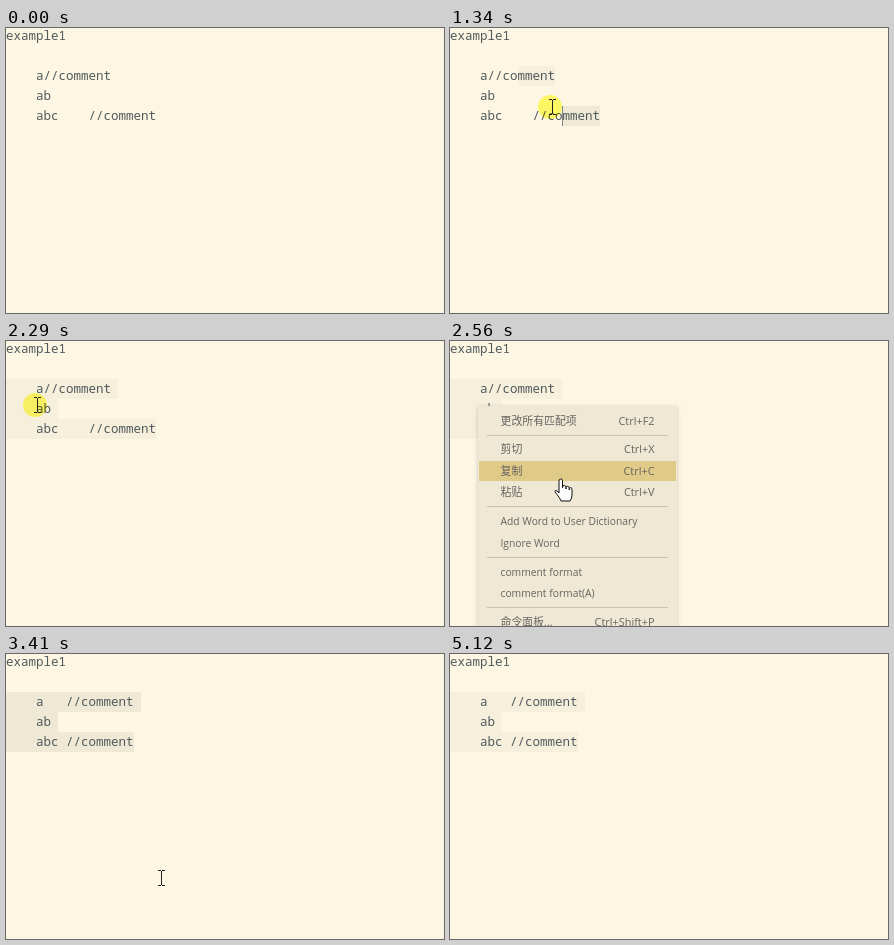
These frames come from a looping animation (438 px wide and 285 px high, 5.19 s). An HTML page:

```html
<!DOCTYPE html>
<html lang="en">
<head>
<meta charset="utf-8">
<title>Comment format</title>
<style>
html, body { margin: 0; height: 100%; overflow: hidden; background: #fdf6e3; }
svg { display: block; width: 438px; height: 285px; }
text { white-space: pre; }
#code { font: 500 12.5px "Noto Sans Mono", monospace; fill: #505a5d; }
#menu { font: 10.9px "Open Sans", "Noto Sans CJK SC", "Noto Sans CJK", sans-serif; fill: #66645f; }
#menu .latin { font-size: 10.3px; }
#panel { fill: #eee8d5; filter: drop-shadow(0 1px 2px #0003); }
#hover { fill: #dfca88; }
#click { fill: #ffff70; mix-blend-mode: multiply; }
</style>
</head>
<body>
<svg viewBox="0 0 438 285">
  <g id="marks" shape-rendering="crispEdges"></g>
  <g id="code"></g>
  <g id="menu">
    <rect id="panel" x="28" y="65" width="199" height="240"/>
    <rect id="hover" x="29" width="197" height="19.6" shape-rendering="crispEdges"/>
  </g>
  <g id="pointer">
    <circle id="click" cx="-2" r="12"/>
    <path id="beam" d="M-3-7.5H0M1-7.5H4M.5-7V7M-3 7.5H0M1 7.5H4" stroke="#222" shape-rendering="crispEdges"/>
    <path id="hand" transform="translate(-1 -1)" fill="#fff" stroke="#111" stroke-linejoin="round"
      d="M-2 14V2q0-2 1.7-2T1.5 2V9V8q0-1.5 1.7-1.5T5 8.5V10V8.5q.3-1.2 1.7-1.2T8.3 9.5V11V9.5q.4-1 1.6-.8T11 10.5V16q0 3-2 6H0q-1-3-4-6.5t-1.5-4Q-4 11-2 14Z"/>
  </g>
</svg>
<script>
const LOOP = 5190, ENTER = 250, STEP = 68;
const CHAR = 7.5, LINE = 20, ROW = 21.5, GAP = 7.3;
const DARK = '#eee8d5', LIGHT = '#f6efdc';
const before = ['example1', '', '    a//comment', '    ab', '    abc    //comment'];
const after = ['example1', '', '    a   //comment', '    ab', '    abc //comment'];
const groups = [
  [['更改所有匹配项', 'Ctrl+F2']],
  [['剪切', 'Ctrl+X'], ['复制', 'Ctrl+C'], ['粘贴', 'Ctrl+V']],
  [['Add Word to User Dictionary'], ['Ignore Word']],
  [['comment format'], ['comment format(A)']],
  [['命令面板...', 'Ctrl+Shift+P']]
];
// Pointer strokes: start, end, target x, target y, height of arc
const strokes = [
  [0, 0, 310, 254], [250, 730, 164, 101], [730, 870, 154, 90],
  [870, 1340, 102, 79], [1340, 1670, 3, 51], [1880, 2280, 31, 64],
  [2360, 2560, 112, 138], [2560, 2900, 155, 224],
  [3740, 3880, 169, 194], [4220, 4650, 410, 272, 58]
];

const $ = id => document.getElementById(id);
const show = (id, on) => $(id).setAttribute('display', on ? 'inline' : 'none');
const within = (t, a, b) => t >= a && t < b;

function add(parent, tag, attrs, text = '') {
  const el = document.createElementNS('http://www.w3.org/2000/svg', tag);
  for (const k in attrs) el.setAttribute(k, attrs[k]);
  el.textContent = text;
  return $(parent).appendChild(el);
}

const rows = before.map((_, i) => add('code', 'text', { x: 0, y: 12 + i * LINE }));

const centers = [];
let cy = 79.65;
groups.forEach((group, i) => {
  if (i) {
    const y = Math.floor(cy - (ROW + GAP) / 2 + GAP);
    add('menu', 'rect', { x: 37, y, width: 181, height: 1, fill: '#c6c1b2' });
    cy += GAP;
  }
  for (const [label, key = ''] of group) {
    const y = Math.round(cy) + 4;
    add('menu', 'text', { x: 50.5, y, class: label < '~' ? 'latin' : '' }, label);
    add('menu', 'text', { x: 204.5, y, 'text-anchor': 'end' }, key);
    centers.push(cy);
    cy += ROW;
  }
});

function pointerAt(t) {
  let x = 0, y = 0;
  for (const [start, end, tx, ty, arc = 0] of strokes) {
    if (t < start) break;
    const k = Math.min(1, (t - start) / (end - start || 1) + !end);
    x += (tx - x) * k;
    y += (ty - y) * k - arc * Math.sin(Math.PI * k);
  }
  return [x, y];
}

function mark(line, x0, x1, fill) {
  if (x1 > x0) add('marks', 'rect', { x: x0, y: line * LINE - 2, width: x1 - x0, height: LINE, fill });
}

function drawSelection(t, step, lines) {
  $('marks').textContent = '';
  if (t < 870) return;
  let line = 2, col = 0;
  const dragging = t < 1740;
  if (dragging) {
    // The selection trails the pointer by one step
    const [x, y] = pointerAt(step - STEP);
    line = Math.max(2, Math.min(4, Math.floor((y + 2) / LINE)));
    col = Math.min(lines[line].length, Math.round(x / CHAR));
  }
  const fill = within(t, 2270, 3410) || t >= 5120 ? LIGHT : DARK;
  for (let i = line; i < 5; i++)
    mark(i, i == line ? col * CHAR : 0, lines[i].length * CHAR + (i < 4 ? 7 : 0), fill);
  // Matching word on the first commented line
  if (line == 4 && col > 10) mark(2, (col - 6) * CHAR, 14 * CHAR, LIGHT);
  if (dragging) mark(line, Math.floor(col * CHAR), Math.floor(col * CHAR) + 1, '#7b8788');
}

function draw(t) {
  const step = ENTER + STEP * Math.floor((t - ENTER) / STEP + .1);
  const lines = t < 3410 ? before : after;
  rows.forEach((row, i) => row.textContent = lines[i]);
  drawSelection(t, step, lines);

  const [x, y] = pointerAt(step).map(Math.round);
  const menu = within(t, 2355, 3410);
  const center = centers.find(c => y > 66 && Math.abs(y - c) <= 10);
  show('menu', menu);
  show('hover', center);
  if (center) $('hover').setAttribute('y', center - 10);

  $('pointer').setAttribute('transform', `translate(${x} ${y})`);
  show('pointer', within(t, ENTER, 4715));
  show('click', within(t, 870, 1875) || within(t, 2190, 2355) || within(t, 3340, 3405));
  show('beam', !menu);
  show('hand', menu);
}

const begin = performance.now();
function tick() {
  draw((performance.now() - begin) % LOOP);
  requestAnimationFrame(tick);
}
tick();
</script>
</body>
</html>
```
